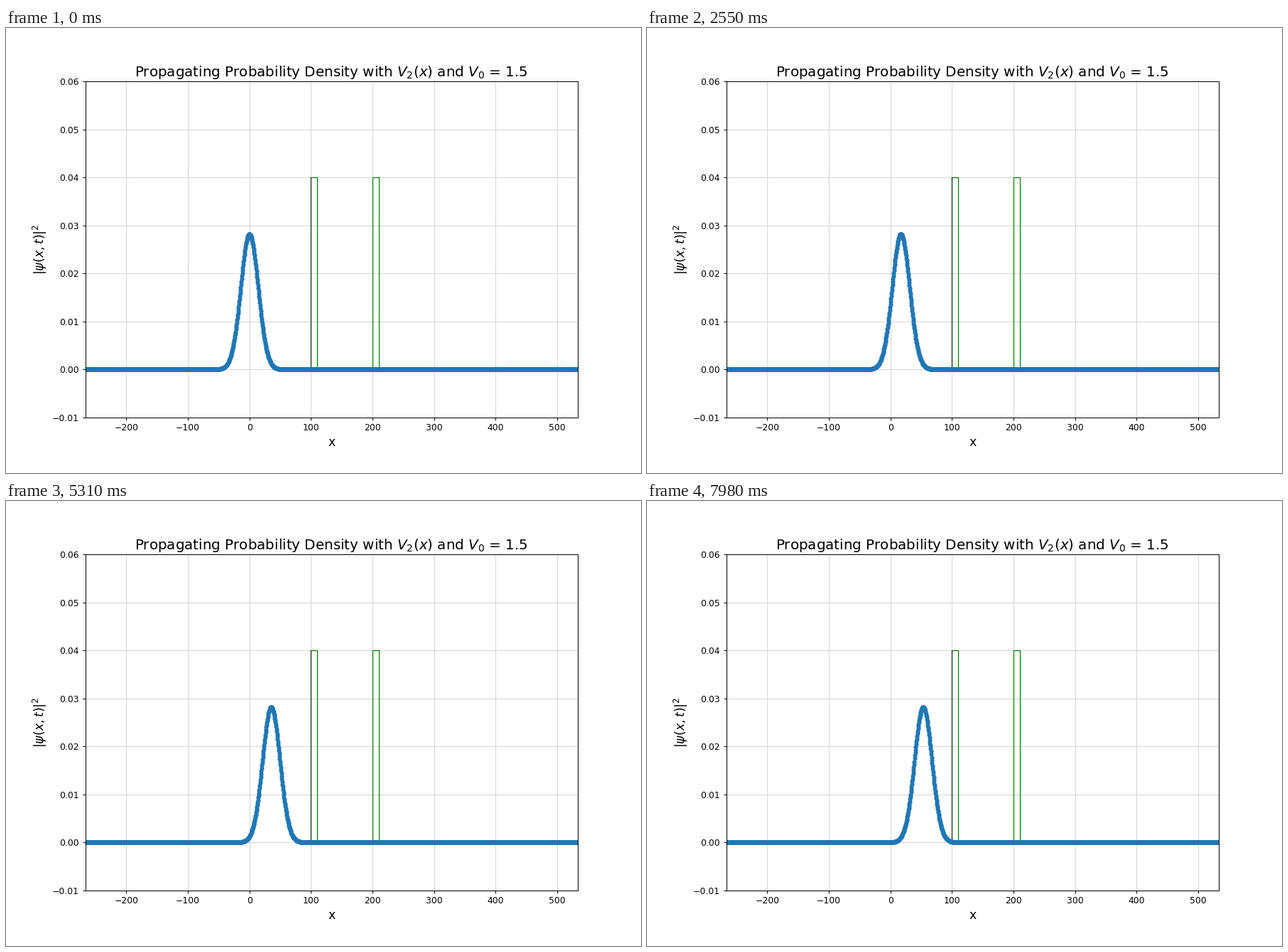
These frames come from a looping animation (894x626 px, 8000 ms). A matplotlib script:

```python
import numpy as np
import matplotlib.pyplot as plt
from matplotlib.animation import FuncAnimation

DPI = 89.4
FRAMES = 267
LOOP_MS = 8000
LENGTH = 800
SIGMA = 10 * np.sqrt(2)   # width of the packet
STEP = 0.2                # distance travelled per frame
BARRIERS = (100, 200)
BARRIER_WIDTH = 10
BARRIER_TOP = 0.04

plt.rcParams["font.family"] = "DejaVu Sans"

fig = plt.figure(figsize=(894 / DPI, 626 / DPI), dpi=DPI, facecolor="white")
ax = fig.add_axes([0.125, 0.125, 0.775, 0.755])
ax.set_xlim(-LENGTH / 3, 2 * LENGTH / 3)
ax.set_ylim(-0.01, 0.06)
ax.set_axisbelow(True)
ax.grid(color="#d5d5d5", linewidth=0.8)
ax.set_title("Propagating Probability Density with $V_2(x)$ and $V_0$ = 1.5",
             fontsize=16)
ax.set_xlabel("x", fontsize=14)
ax.set_ylabel(r"$|\psi(x,t)|^2$", fontsize=14)

for left in BARRIERS:
    right = left + BARRIER_WIDTH
    ax.plot([left, left, right, right], [0, BARRIER_TOP, BARRIER_TOP, 0],
            color="green", linewidth=1)
# The first wall has a darker front edge
ax.plot([BARRIERS[0]] * 2, [0, BARRIER_TOP], color="#26362a", linewidth=1)

x = np.arange(-LENGTH / 3, 2 * LENGTH / 3 + 0.5, 0.5)
packet, = ax.plot([], [], "o", color="#1f77b4", markersize=4,
                  markeredgewidth=1, zorder=2.2)


def density(center):
    peak = 1 / (SIGMA * np.sqrt(2 * np.pi))
    return peak * np.exp(-(x - center) ** 2 / (2 * SIGMA ** 2))


def update(frame):
    packet.set_data(x, density(STEP * frame))
    return packet,


def init():
    return update(0)


anim = FuncAnimation(fig, update, frames=FRAMES, init_func=init,
                     interval=LOOP_MS / FRAMES, repeat=True, repeat_delay=0)
plt.show()
```
